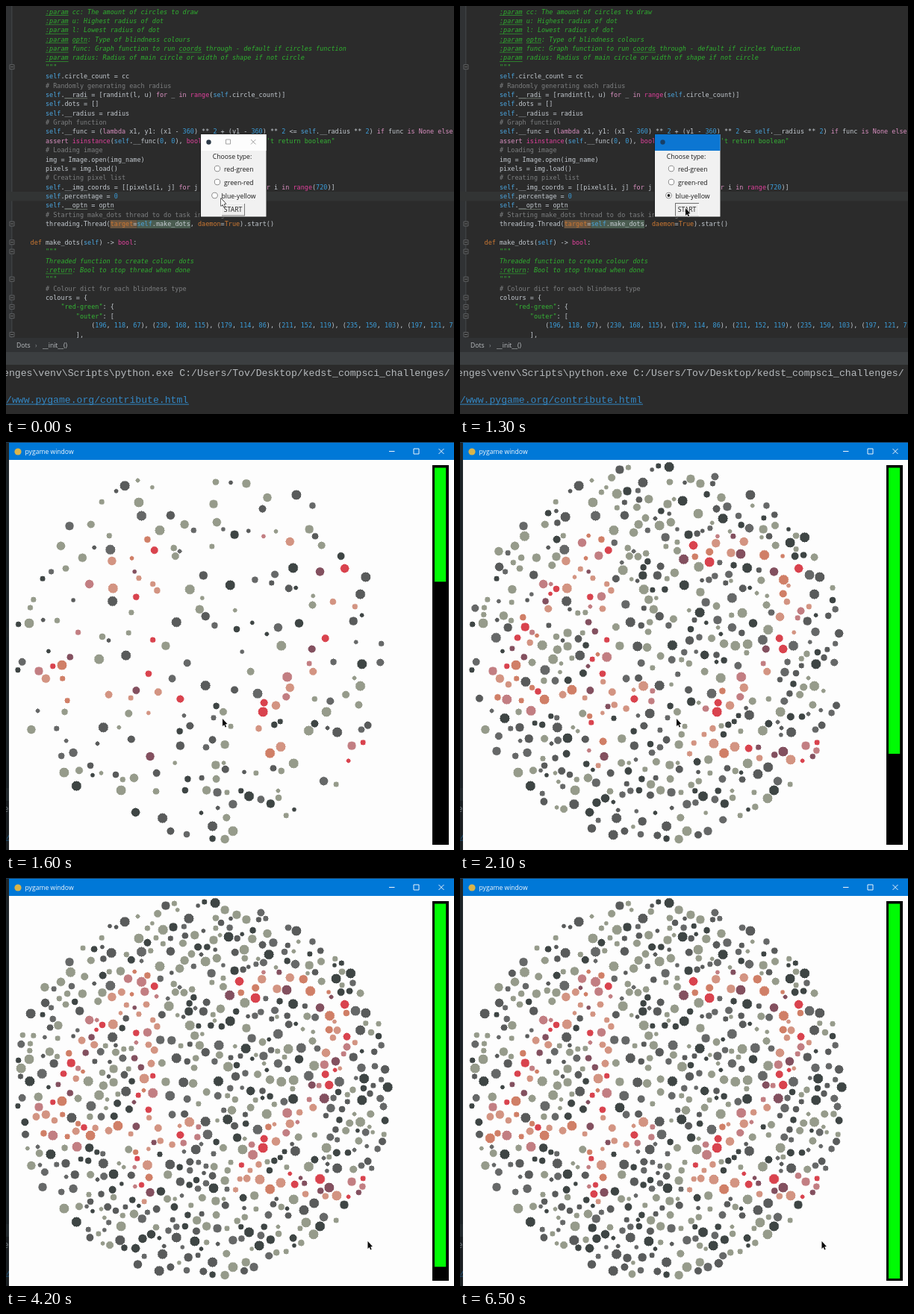
Recreate the animation shown at these times as an HTML page with a canvas. Size 600x547 px, loop 6.9 s.

```html
<!DOCTYPE html>
<html lang="en">
<head>
<meta charset="utf-8">
<title>Colour dot test</title>
<style>
  html, body { margin: 0; width: 100%; height: 100%; overflow: hidden; background: #2b2b2b; }
  canvas { display: block; width: 600px; height: 547px; }
</style>
</head>
<body>
<canvas id="stage" width="600" height="547"></canvas>
<script>
const LOOP = 6900, STEP = 100;
const SELECT = 400, PRESS = 1100, OPEN = 1400, RUN = 1500, FINISH = 6200;
const ctx = document.getElementById('stage').getContext('2d');
const MONO = '"DejaVu Sans Mono", monospace';
const TERMINAL = '"Liberation Mono", monospace';
const UI = '"Open Sans", sans-serif';

// ---------- helpers ----------
function rect(x, y, w, h, color) {
  ctx.fillStyle = color;
  ctx.fillRect(x, y, w, h);
}

function frame(x, y, size, color, width = 1) {
  ctx.strokeStyle = color;
  ctx.lineWidth = width;
  ctx.strokeRect(x, y, size, size);
}

function text(str, x, y, font, color, align = 'left') {
  ctx.font = font;
  ctx.fillStyle = color;
  ctx.textAlign = align;
  ctx.fillText(str, x, y);
}

function line(x1, y1, x2, y2, color, width = 1) {
  ctx.strokeStyle = color;
  ctx.lineWidth = width;
  ctx.beginPath();
  ctx.moveTo(x1, y1);
  ctx.lineTo(x2, y2);
  ctx.stroke();
}

function cross(x, y, r, color, width) {
  line(x - r, y - r, x + r, y + r, color, width);
  line(x - r, y + r, x + r, y - r, color, width);
}

function disc(x, y, r, color) {
  ctx.fillStyle = color;
  ctx.beginPath();
  ctx.arc(x, y, r, 0, 7);
  ctx.fill();
}

function seeded(seed) {
  return () => {
    seed = (seed + 0x6D2B79F5) | 0;
    let v = Math.imul(seed ^ (seed >>> 15), 1 | seed);
    v = (v + Math.imul(v ^ (v >>> 7), 61 | v)) ^ v;
    return ((v ^ (v >>> 14)) >>> 0) / 4294967296;
  };
}

// ---------- editor ----------
const CELL = 5.1, ROW = 12.37, LEFT = 12.2;
const CODE = `        :param cc: The amount of circles to draw
        :param u: Highest radius of dot
        :param l: Lowest radius of dot
        :param optn: Type of blindness colours
        :param func: Graph function to run coords through - default if circles function
        :param radius: Radius of main circle or width of shape if not circle
        """
        self.circle_count = cc
        # Randomly generating each radius
        self.__radi = [randint(l, u) for _ in range(self.circle_count)]
        self.dots = []
        self.__radius = radius
        # Graph function
        self.__func = (lambda x1, y1: (x1 - 360) ** 2 + (y1 - 360) ** 2 <= self.__radius ** 2) if func is None else
        assert isinstance(self.__func(0, 0), bool), "Functor doesn't return boolean"
        # Loading image
        img = Image.open(img_name)
        pixels = img.load()
        # Creating pixel list
        self.__img_coords = [[pixels[i, j] for j in range(720)] for i in range(720)]
        self.percentage = 0
        self.__optn = optn
        # Starting make_dots thread to do task in background
        threading.Thread(target=self.make_dots, daemon=True).start()

    def make_dots(self) -> bool:
        """
        Threaded function to create colour dots
        :return: Bool to stop thread when done
        """
        # Colour dict for each blindness type
        colours = {
            "red-green": {
                "outer": [
                    (196, 118, 67), (230, 168, 115), (179, 114, 86), (211, 152, 119), (235, 150, 103), (197, 121, 71
                ],`.split('\n');

const DOC = /^\s*(:|Threaded)/;
const FOLD = /^\s*("""|def |\],|threading)|[{[]$/;
const TOKEN_COLORS = [
  [/^#/, '#7d7f80'],
  [/^"/, '#35b335'],
  [/^\d/, '#3b9edb'],
  [/^self$/, '#4aa3dc'],
  [/^(range|isinstance|bool)$/, '#e0409c'],
  [/^(for|in|if|is|None|else|lambda|assert)$/, '#d98fc0'],
  [/^(def|target|daemon|True)$/, '#cc7832'],
  [/./, '#c3c9cf']
];
const tokenColor = tok => TOKEN_COLORS.find(([rule]) => rule.test(tok))[1];

function drawCode() {
  rect(0, 249, 600, 12.4, '#323434');
  rect(139.5, 287, 36, 11, '#6a5540');
  rect(175.5, 287, 71.5, 11, '#4a5c50');
  CODE.forEach((row, i) => {
    const y = 7.5 + i * ROW, base = y + 3.1;
    const doc = DOC.test(row);
    const parts = doc ? /\S+/g : /#.*|"[^"]*"?|\w+|[^\w\s#"]+/g;
    const font = `${doc ? 'italic ' : ''}8.47px ${MONO}`;
    for (const { 0: tok, index } of row.matchAll(parts)) {
      const x = LEFT + index * CELL;
      text(tok, x, base, font, doc ? '#2fb02f' : tokenColor(tok));
      const mark = tok.match(/^:\w+|^optn|^coords|__radi$|__optn$/);
      if (mark) rect(x, base + 1.6, mark[0].length * CELL, 0.7, doc ? '#2fa52f' : '#7d8a7d');
    }
    if (FOLD.test(row)) {
      rect(5, y - 3, 6, 6, '#2b2b2b');
      frame(5, y - 3, 6, '#6a6d6f', 0.8);
      line(6.3, y, 9.7, y, '#8a8d8f', 0.8);
    }
  });
}

function drawEditor() {
  rect(0, 0, 600, 547, '#2b2b2b');
  rect(0, 0, 8, 446, '#303234');
  rect(7.5, 0, 0.8, 446, '#4b4e50');
  drawCode();
  rect(0, 445, 600, 20, '#303234');
  const small = `8.6px ${UI}`;
  text('Dots', 14, 458, small, '#b9bdc0');
  text('›', 39, 458, small, '#85898c');
  text('__init__()', 49, 458, small, '#b9bdc0');
  rect(0, 464, 600, 17, '#3c3f41');
  const font = `13.13px ${TERMINAL}`;
  text('enges\\venv\\Scripts\\python.exe C:/Users/Tov/Desktop/kedst_compsci_challenges/',
    -4, 495.5, font, '#b6babd');
  text('/www.pygame.org/contribute.html', 0, 531.5, font, '#3387c4');
  rect(0, 533.5, 245, 1, '#3387c4');
}

// ---------- type chooser ----------
function drawChooser(t) {
  const active = t >= SELECT, pressed = t >= PRESS;
  const font = `8.7px ${UI}`, ink = '#1b1b1b';
  rect(260, 171.5, 89, 112, '#1d1e1f');
  rect(261, 172, 87.5, 110.5, '#f1f1f1');
  rect(261, 172, 87.5, 22, active ? '#0c76d2' : '#fdfdfd');
  disc(271.5, 182.5, 3.2, active ? '#173f66' : '#2c3a48');
  if (!active) {
    frame(294.5, 179, 6, '#9a9a9a', 0.9);
    cross(331.2, 182.2, 3.2, '#9a9a9a', 0.9);
  }
  text('Choose type:', 303, 205, font, ink, 'center');
  ['red-green', 'green-red', 'blue-yellow'].forEach((label, i) => {
    const last = i === 2, x = last ? 279.5 : 283, y = 218 + i * 18;
    disc(x, y, 4.2, '#6f6f6f');
    disc(x, y, 3.4, '#ffffff');
    if (last && active) disc(x, y, 1.9, '#222222');
    text(label, x + 9, y + 3.6, font, ink);
  });
  rect(288, 264, 32, 17.5, pressed ? '#707070' : '#fafafa');
  rect(289, 265, 31, 16.5, pressed ? '#fafafa' : '#7a7a7a');
  rect(289, 265, 30, 15.5, '#eeeeee');
  text('START', 304, 276, font, ink, 'center');
}

// ---------- dots ----------
const SIZE = 720, SCALE = 0.72, COUNT = 780;
const ORIGIN = [4, 23];

// Repeated colours are more common
const RED = '#d9434e', ORANGE = '#d07f67', TAN = '#d39482', PLUM = '#83505f', PINK = '#c27e82';
const DARK = '#3e4544', GREY = '#666868', SLATE = '#595b5b', SAGE = '#969b8b';
const INK = [RED, ORANGE, TAN, TAN, PLUM, PINK];
const OUTER = [DARK, GREY, SLATE, SAGE, SAGE];

// Pen strokes of the hidden digits, in stage pixels
const STROKES = [
  [[187, 128], [187, 425]],
  [[172, 138], [112, 215], [52, 325]],
  [[44, 343], [248, 343]],
  [[312, 148], [380, 133], [442, 175], [453, 215], [410, 298], [338, 365], [316, 408], [480, 411]]
];

function segmentDistance(x, y, [ax, ay], [bx, by]) {
  const dx = bx - ax, dy = by - ay;
  const p = ((x - ax) * dx + (y - ay) * dy) / (dx * dx + dy * dy);
  const q = Math.min(1, Math.max(0, p));
  return Math.hypot(x - ax - q * dx, y - ay - q * dy);
}

const inDigit = (x, y) => STROKES.some(s =>
  s.some((p, i) => i > 0 && segmentDistance(x, y, s[i - 1], p) < 17));

// Random spots in the big circle that keep clear of earlier dots
function makeDots() {
  const rnd = seeded(4242);
  const dots = [];
  const fits = (x, y, r) => dots.every(d => Math.hypot(d.x - x, d.y - y) > d.r + r + 1);
  while (dots.length < COUNT) {
    let r = 4 + Math.floor(rnd() * 6), x, y, tries = 0;
    do {
      const angle = rnd() * Math.PI * 2, reach = 350 * Math.sqrt(rnd());
      x = Math.round(360 + reach * Math.cos(angle));
      y = Math.round(360 + reach * Math.sin(angle));
      if (++tries % 400 === 0 && r > 4) r--;
    } while (!fits(x, y, r));
    const set = inDigit(ORIGIN[0] + x * SCALE, ORIGIN[1] + y * SCALE) ? INK : OUTER;
    dots.push({ x, y, r, color: set[Math.floor(rnd() * set.length)] });
  }
  return dots;
}

const dots = makeDots();
const board = document.createElement('canvas');
board.width = board.height = SIZE;
const pen = board.getContext('2d');

// Hard-edged discs built from pixel rows
function drawBoard(count) {
  pen.clearRect(0, 0, SIZE, SIZE);
  for (const { x, y, r, color } of dots.slice(0, count)) {
    pen.fillStyle = color;
    for (let dy = -r; dy <= r; dy++) {
      const half = Math.floor(Math.sqrt(r * r - dy * dy));
      pen.fillRect(x - half, y + dy, half * 2 + 1, 1);
    }
  }
}

// ---------- dot window ----------
// Free space gets rarer, so the remainder shrinks with the square of time
function progress(t) {
  return t >= FINISH ? 1 : 1 - 0.341 / ((t - 900) / 1000) ** 2;
}

function drawTitle(x, y, w, color) {
  rect(x, y, w, 23, color);
  disc(x + 12, y + 12, 4.6, '#d9b44a');
  text('pygame window', x + 21.5, y + 15, `8.6px ${UI}`, '#f4f8fc');
}

function drawControls(x, y) {
  const color = '#eef5fb';
  line(x - 70, y, x - 62.5, y, color);
  frame(x - 37, y - 3.5, 7, color);
  cross(x, y, 3.5, color);
}

function drawOpening() {
  rect(0, 0, 600, 547, 'rgba(0,0,0,.6)');
  rect(5, 2, 593, 544, '#0d4a80');
  ctx.save();
  ctx.beginPath();
  ctx.rect(6, 25, 591, 520);
  ctx.clip();
  drawEditor();
  rect(0, 0, 600, 547, 'rgba(2,0,3,.88)');
  ctx.restore();
  drawTitle(5.5, 2, 592, '#0671c4');
  drawControls(581, 14);
}

function drawWindow(t) {
  const done = progress(t);
  rect(0, 0, 4, 547, 'rgba(10,20,28,.45)');
  rect(0, 0, 600, 1, '#1c3a55');
  rect(4, 23, 596, 524, '#fdfdfd');
  drawTitle(4, 1, 596, '#0078d7');
  drawControls(583, 12.5);
  drawBoard(Math.round(done * COUNT));
  ctx.drawImage(board, ...ORIGIN, SIZE * SCALE, SIZE * SCALE);
  rect(571, 31, 22, 509, '#000000');
  rect(574, 34.5, 15.2, 502.5 * done, '#00fb04');
}

// ---------- pointer ----------
// Time, x, y
const STOPS = [
  [300, 288, 258], [1000, 302, 271], [1300, 302, 271], [1400, 291, 363],
  [1500, 290, 371], [2200, 290, 371], [2800, 484.5, 487]
];
const ARROW = [[0, 0], [0, 10], [2.2, 8], [3.7, 11.4], [5.1, 10.7], [3.7, 7.4], [6.4, 7.1]];

function pointerAt(t) {
  const next = STOPS.findIndex(s => s[0] > t);
  if (next < 1) return (next ? STOPS[STOPS.length - 1] : STOPS[0]).slice(1);
  const [t0, x0, y0] = STOPS[next - 1], [t1, x1, y1] = STOPS[next];
  const p = (t - t0) / (t1 - t0), ease = p * p * (3 - 2 * p);
  return [x0 + (x1 - x0) * ease, y0 + (y1 - y0) * ease];
}

function drawPointer(t) {
  const [x, y] = pointerAt(t);
  const light = t < SELECT;
  ctx.beginPath();
  ARROW.forEach(([dx, dy]) => ctx.lineTo(x + dx, y + dy));
  ctx.closePath();
  ctx.lineJoin = 'round';
  ctx.strokeStyle = light ? '#111111' : '#f4f4f4';
  ctx.lineWidth = 1.2;
  ctx.stroke();
  ctx.fillStyle = light ? '#ffffff' : '#0a0a0a';
  ctx.fill();
}

// ---------- playback ----------
function draw(t) {
  drawEditor();
  if (t < OPEN) drawChooser(t);
  else if (t < RUN) drawOpening();
  else drawWindow(t);
  drawPointer(t);
}

let start = null, shown = -1;
function tick(now) {
  if (start === null) start = now;
  const elapsed = Math.max(0, now - start) % LOOP;
  const t = Math.floor(elapsed / STEP) * STEP;
  if (t !== shown) draw(shown = t);
  requestAnimationFrame(tick);
}
draw(0);
requestAnimationFrame(tick);
</script>
</body>
</html>
```
